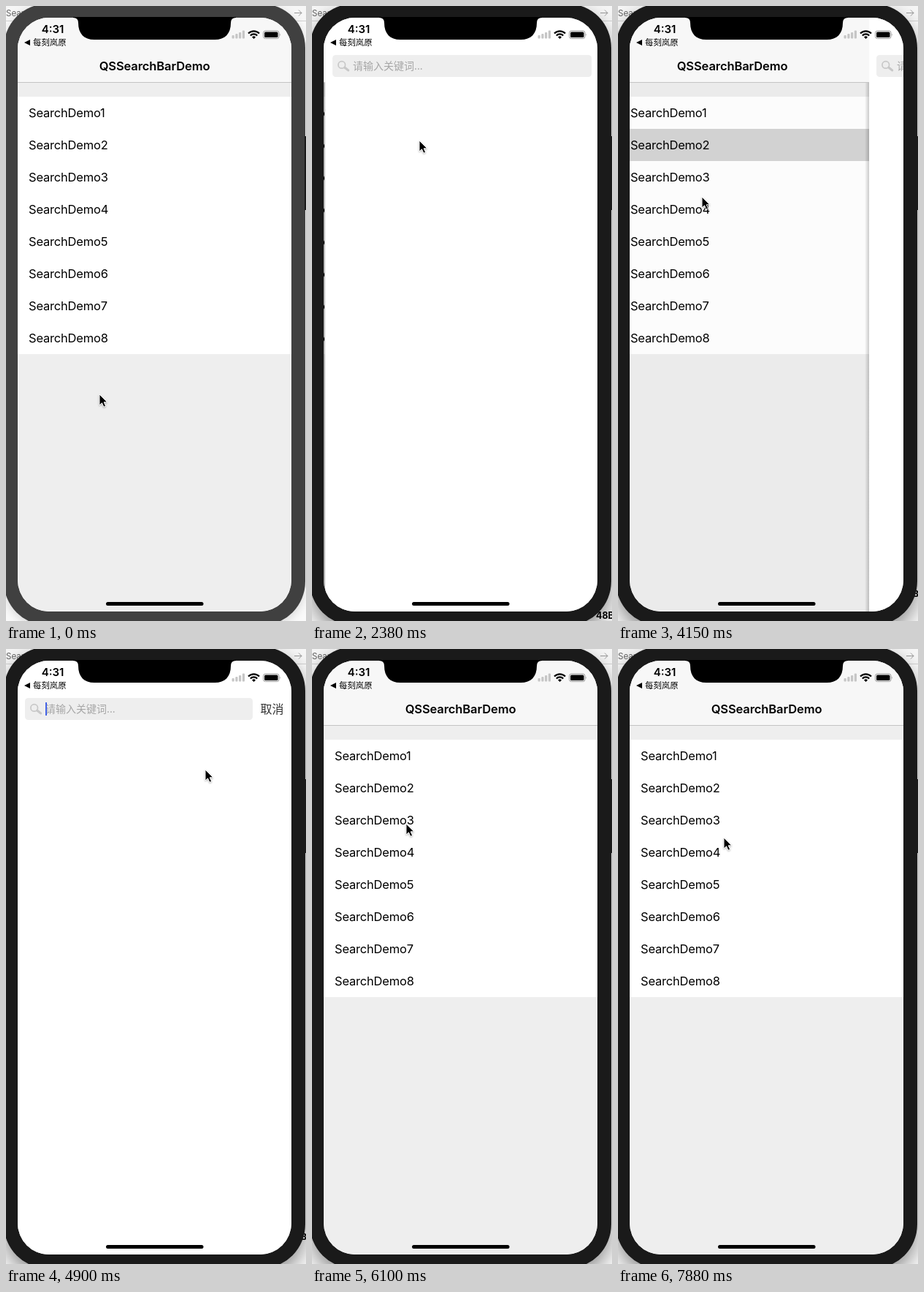
Write an HTML page that moves like this. It is 411 px wide and 841 px high and loops after 8000 ms.

```html
<!DOCTYPE html>
<html lang="zh">
<head>
<meta charset="utf-8">
<title>Search bar demo</title>
<style>
  html, body { margin: 0; width: 100%; height: 100%; overflow: hidden; background: #fff; }
  #stage { position: relative; width: 411px; height: 841px; overflow: hidden; background: linear-gradient(#f6f6f6 20px, #d2d2d2 20px 21px, #fafafa 21px); }
  #shadow { position: absolute; left: -3px; top: -3px; width: 413px; height: 850px; border-radius: 60px; box-shadow: 0 4px 14px rgba(0,0,0,.14); }
  .active #shadow { box-shadow: 0 12px 26px rgba(0,0,0,.42); }
  svg { position: absolute; left: 0; top: 0; }
  text { font-family: Inter, "Noto Sans CJK SC", "Noto Sans CJK", sans-serif; }
  .cjk { font-family: "Noto Sans CJK SC", "Noto Sans CJK", sans-serif; }
  .row { font-size: 16.5px; letter-spacing: -.2px; }
  .title { font-size: 16.5px; font-weight: 600; letter-spacing: -.1px; }
  #bezel { fill: #404040; }
  .active #bezel { fill: #1a1a1a; }
</style>
</head>
<body>
<div id="stage">
  <svg width="411" height="841">
    <text x="0" y="14" font-size="11.5" fill="#666">Search</text>
    <path d="M395 9.5h10m-4-4 4 4-4 4" fill="none" stroke="#999"/>
    <text id="size" x="389" y="838" font-size="12.5" font-weight="700">48B</text>
    <text id="edge" x="404" y="808" font-size="12" font-weight="700">B</text>
  </svg>
  <div id="shadow"></div>
  <svg width="411" height="841">
    <defs>
      <clipPath id="screen"><rect x="16" y="16" width="375" height="812" rx="43"/></clipPath>
      <linearGradient id="fade"><stop stop-opacity="0"/><stop offset="1" stop-opacity=".2"/></linearGradient>
    </defs>
    <rect id="bezel" x="-3" y="-3" width="413" height="850" rx="60"/>
    <rect x="409" y="178" width="2" height="101" fill="#1a1a1a"/>
    <g clip-path="url(#screen)">
      <rect x="16" y="16" width="375" height="812" fill="#fff"/>
      <g id="list">
        <rect x="16" y="16" width="375" height="812" fill="#eee"/>
        <rect x="16" y="124" width="375" height="352" fill="#fff"/>
        <rect id="mark" x="16" width="375" height="44" fill="#d4d4d4"/>
        <g id="rows"></g>
        <rect id="dim" x="16" y="16" width="375" height="812"/>
      </g>
      <g id="page">
        <rect id="pageShadow" x="-6" y="105" width="6" height="723" fill="url(#fade)"/>
        <rect y="16" width="375" height="812" fill="#fff"/>
        <g id="back">
          <rect x="10" y="67" width="33" height="30" rx="4.5" fill="#a9a9a9"/>
          <text class="cjk" x="10.5" y="88" font-size="16" fill="#333">返回</text>
        </g>
        <rect id="field" y="67" height="30" rx="4.5"/>
        <g id="hint">
          <g fill="none" stroke="#c8c8c8">
            <circle cx="12.7" cy="80.4" r="4.8" stroke-width="1.7"/>
            <path d="M16.7 84l5 4" stroke-width="3" stroke-linecap="round"/>
          </g>
          <text id="prompt" class="cjk" x="28" y="87" font-size="14">请输入关键词...</text>
          <rect id="caret" x="28" y="73" width="2" height="18" fill="#4262e6"/>
        </g>
        <g id="cancel">
          <rect id="cancelBox" x="332" y="67" width="33" height="30" rx="4.5" fill="#a9a9a9"/>
          <text class="cjk" x="332.5" y="88" font-size="16" fill="#333">取消</text>
        </g>
      </g>
      <g id="bar">
        <rect x="16" y="16" width="375" height="88" fill="#f7f7f7"/>
        <rect x="16" y="104" width="375" height="1" fill="#c4c4c4"/>
        <text class="title" x="203.5" y="88" text-anchor="middle">QSSearchBarDemo</text>
      </g>
      <text x="64" y="37" font-size="15" font-weight="600" text-anchor="middle">4:31</text>
      <path d="M25 50l8-4v8z"/>
      <text class="cjk" x="37" y="54" font-size="11.4" font-weight="500">每刻岚原</text>
      <g fill="#c6c6c6">
        <rect x="309.5" y="40" width="3.2" height="4.5" rx="1"/>
        <rect x="314.3" y="38" width="3.2" height="6.5" rx="1"/>
        <rect x="319" y="36" width="3.2" height="8.5" rx="1"/>
        <rect x="323.8" y="33.5" width="3.2" height="11" rx="1"/>
      </g>
      <g fill="none" stroke="#000" stroke-width="2.2">
        <path d="M332 37.6a10.4 10.4 0 0 1 15 0M334.8 40.4a6.5 6.5 0 0 1 9.4 0"/>
        <path d="M337 42.4a3.6 3.6 0 0 1 5 0l-2.5 2.6z" fill="#000" stroke="none"/>
      </g>
      <rect x="352.5" y="34" width="21.5" height="10.5" rx="2.8" fill="none" stroke="#999"/>
      <rect x="354" y="35.5" width="18.5" height="7.5" rx="1.5"/>
      <path d="M375.3 37.5q1.6 1.7 0 3.6z" fill="#999"/>
      <rect x="137" y="815" width="133.5" height="5" rx="2.5"/>
    </g>
    <path id="notch" d="M92 15v1q7 0 7 7c0 15 8 23 22 23h165c14 0 22-8 22-23q0-7 7-7v-1z"/>
    <path id="cursor" d="M0 0v15l3.5-3.2 2.4 5.5 2.7-1.2-2.4-5.3h4.6z" stroke="#fff" style="filter:drop-shadow(0 1px 1px rgba(0,0,0,.3))"/>
  </svg>
</div>
<script>
const LOOP = 8000, STEP = 148.6, WIDTH = 375;
const ACTIVATE = 1640;
const visits = [
  { push: 1966, pop: 3260 },
  { push: 4139, pop: 5360 },
  { push: 6240, pop: 7280, grey: true },
];
// Pointer waypoints: time, x, y
const trail = [
  [0, 128, 531], [450, 196, 600], [750, 215, 616], [1050, 190, 560], [1500, 122, 215],
  [1800, 126, 148], [1960, 126, 150], [2378, 147, 184], [2880, 300, 130], [3160, 362, 79],
  [3290, 362, 80], [3700, 190, 175], [4010, 112, 196], [4161, 115, 261], [4904, 273, 165],
  [5230, 380, 80], [5390, 380, 80], [5750, 230, 185], [6093, 129, 239], [6280, 130, 237],
  [7133, 279, 159], [7250, 366, 80], [7320, 366, 80], [7876, 145, 258], [8000, 141, 266],
];

const $ = id => document.getElementById(id);
const clamp = v => Math.min(1, Math.max(0, v));
const ease = p => 1 - (1 - clamp(p)) ** 3;
const move = (id, x, y = 0) => $(id).setAttribute('transform', `translate(${x} ${y})`);
const set = (id, name, value) => $(id).setAttribute(name, value);
const show = (id, on) => { $(id).style.opacity = Number(on); };

$('rows').innerHTML = Array.from({ length: 8 }, (_, i) =>
  `<text class="row" x="31" y="${152 + 44 * i}">SearchDemo${i + 1}</text>`).join('');

function pointer(t) {
  const i = Math.max(1, trail.findIndex(p => p[0] >= t));
  const [a, b] = [trail[i - 1], trail[i]];
  const p = (t - a[0]) / (b[0] - a[0]);
  const s = p * p * (3 - 2 * p);
  return [a[1] + (b[1] - a[1]) * s, a[2] + (b[2] - a[2]) * s];
}

function drawPage(t) {
  const index = Math.max(0, visits.findLastIndex(v => t >= v.push));
  const { push, pop, grey } = visits[index];
  const open = ease((t - push) / 500) - ease((t - pop) / 500);
  const focus = ease((t - push - 480) / 250) - ease((t - pop) / 250);
  const left = grey ? 53 : 10;

  move('page', 16 + WIDTH * (1 - open));
  move('bar', -WIDTH * open);
  move('list', -WIDTH * .3 * open);
  show('dim', .1 * open);
  show('page', open > 0);
  show('pageShadow', open < 1);
  set('mark', 'y', 124 + 44 * index);
  show('mark', t < push ? 0 : 1 - clamp((t - push - 60) / 350));

  show('back', !!grey);
  set('field', 'x', left);
  set('field', 'width', 365 - 43 * focus - left);
  set('field', 'fill', grey ? '#a9a9a9' : '#eee');
  set('prompt', 'fill', grey ? '#929292' : '#a6a6a6');
  move('hint', left);
  show('caret', focus > .9);
  show('cancel', focus);
  show('cancelBox', !!grey);
}

function render(time) {
  const t = Math.floor((time + 15) / STEP) * STEP;
  $('stage').classList.toggle('active', t >= ACTIVATE);
  show('size', t >= ACTIVATE && t < 2700);
  show('edge', t >= 2700 && t < 5900);
  drawPage(t);
  move('cursor', ...pointer(Math.min(t, LOOP)));
}

const start = performance.now();
function tick() {
  render((performance.now() - start) % LOOP);
  requestAnimationFrame(tick);
}
tick();
</script>
</body>
</html>
```
